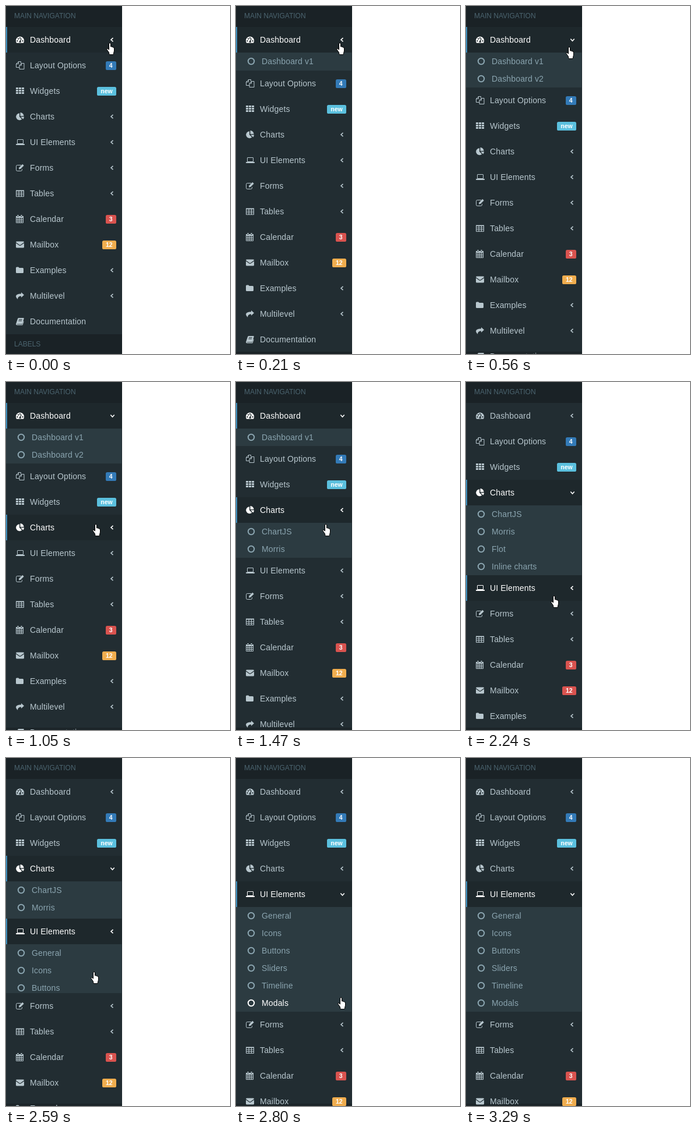
These frames come from a looping animation (384x598 px, 3.57 s). An HTML page:

```html
<!DOCTYPE html>
<html lang="en">
<head>
<meta charset="utf-8">
<title>Sidebar menu</title>
<style>
  html, body { margin: 0; width: 100%; height: 100%; overflow: hidden; background: #fff; }
  nav {
    position: absolute; left: 0; top: 0; width: 199px; height: 598px; overflow: hidden;
    background: linear-gradient(#222d32 594px, #1c2529 0);
    font: 14px "Liberation Sans", Arial, sans-serif; color: #b8c7ce; white-space: nowrap;
  }
  header { height: 36px; padding-left: 14px; box-sizing: border-box; background: #1a2226; color: #4b646f; font-size: 12px; line-height: 34px; }
  .row { position: relative; height: 44px; padding-left: 41px; line-height: 44px; letter-spacing: .15px; }
  .row.on { background: #1e282c; color: #fff; box-shadow: inset 2px 0 #3c8dbc; }
  .sub { width: 198px; height: 0; overflow: hidden; background: #2c3b41; color: #8aa4af; }
  .leaf { position: relative; height: 30px; padding-left: 44px; line-height: 30px; letter-spacing: .15px; }
  .leaf.on { color: #fff; }
  svg { position: absolute; overflow: visible; fill: currentColor; fill-rule: evenodd; }
  .line { fill: none; stroke: currentColor; }
  .icon { left: 17px; top: 15px; width: 14px; height: 14px; }
  .ring { left: 20px; top: 9px; width: 12px; height: 12px; stroke-width: 2; }
  .angle { left: 178px; top: 18px; width: 8px; height: 8px; stroke-width: 1.6; }
  .active .angle { transform: translate(.5px, 0) rotate(-90deg); }
  .badge {
    position: absolute; right: 10px; top: 15px; padding: 2.1px 6.3px 2.4px; border-radius: 2.6px;
    font: bold 10.5px/10.5px "Liberation Sans", Arial, sans-serif; letter-spacing: 0; color: #fff;
  }
  #pointer { left: 0; top: 0; width: 14px; height: 21px; }
  #pointer path { fill: #fff; stroke: #000; stroke-linejoin: round; }
</style>
</head>
<body>
<nav id="nav"></nav>
<svg id="pointer"><path id="shape"/></svg>
<script>
const BLUE = '#337ab7', CYAN = '#5bc0de', RED = '#d9534f', AMBER = '#f0ad4e';

// icon: [filled path, stroked path, stroke width]
const items = [
  { name: 'Dashboard', sub: ['Dashboard v1', 'Dashboard v2'],
    icon: ['M0 8.5a7 7 0 0 1 14 0q0 2-1 4H1Q0 10.500 0 8.500zM1.500 8h2v2h-2zM3 4.500h2v2H3zM6 3h2v2H6zM10.500 8h2v2h-2zM8.800 4.600l1.200.4-1.700 4a1.600 1.600 0 1 1-1.200-.4z'] },
  { name: 'Layout Options', badge: ['4', BLUE],
    icon: ['', 'M8.500 3V.5h-4l-4 4v6h5.500M4.500.5v4h-4M9.500 3.500h4.500v10H6v-6.500zM9.500 3.500v3.500H6'] },
  { name: 'Widgets', badge: ['new', CYAN],
    icon: ['M0 1h4v3H0zM5 1h4v3H5zM10 1h4v3h-4zM0 5h4v3H0zM5 5h4v3H5zM10 5h4v3h-4zM0 9h4v3H0zM5 9h4v3H5zM10 9h4v3h-4z'] },
  { name: 'Charts', sub: ['ChartJS', 'Morris', 'Flot', 'Inline charts'],
    icon: ['M6 1.200a6 6 0 1 0 4.300 10.400L6 7.300zM7.500 0a6 6 0 0 1 6 6h-6zM8 7.300h6a6 6 0 0 1-1.800 4.200z'] },
  { name: 'UI Elements', sub: ['General', 'Icons', 'Buttons', 'Sliders', 'Timeline', 'Modals'],
    icon: ['M0 10h15v1q0 1-1 1H1q-1 0-1-1z', 'M2.500 9.500V3q0-.5.5-.5h9q.5 0 .5.5v6.500z'] },
  { name: 'Forms', tree: true,
    icon: ['M5 9.500l.3-2.700L11.300.8l2.400 2.400L7.700 9.200z', 'M9 2.500H2.500q-2 0-2 2v6q0 2 2 2h6q2 0 2-2V9'] },
  { name: 'Tables', tree: true,
    icon: ['M0 1.500h14v2H0z', 'M.5 2v10.500h13V2M.5 6.500h13M.5 9.500h13M5 3v9.500M9.500 3v9.500'] },
  { name: 'Calendar', badge: ['3', RED],
    icon: ['M0 2h13v3H0zM2.500 0h2v3h-2zM8.500 0h2v3h-2z', 'M.5 3v10.500h12V3M.5 7.500h12M.5 10.500h12M3.500 5v8.500M6.500 5v8.500M9.500 5v8.500'] },
  { name: 'Mailbox', badge: ['12', AMBER],
    icon: ['M0 3q0-1.500 1.500-1.500h11Q14 1.500 14 3L7.800 7.500q-.8.5-1.600 0zM0 4.500l5.700 4q1.300.8 2.600 0L14 4.500v6.500q0 1.500-1.500 1.500h-11Q0 12.500 0 11z'] },
  { name: 'Examples', tree: true,
    icon: ['M0 3q0-1.500 1.500-1.500h2.500q1.500 0 1.500 1.500h6q1.500 0 1.500 1.500v6q0 1.500-1.500 1.500h-10Q0 12 0 10.500z'] },
  { name: 'Multilevel', tree: true,
    icon: ['M9 1l5 4.500L9 10V7.500q-6 0-6 5.500Q0 10 0 8q0-4.500 9-4.500z'] },
  { name: 'Documentation',
    icon: ['M4.500 1H13q1 0 .7 1l-2.400 8.500q-.3 1-1.300 1H2.500q-1 0-.8.8h9.300l1.600-5.800 1 .5-1.700 5.500q-.3 1-1.200 1H2q-2 0-2-2L3 2.500Q3.500 1 4.500 1zM5.200 3.300l-.3 1h5.600l.3-1zM4.600 5.500l-.3 1h5.600l.3-1z'] }
];

const iconSvg = ([fill, line = '']) =>
  `<svg class="icon"><path d="${fill}"/><path class="line" d="${line}"/></svg>`;
const angle = '<svg class="angle"><path class="line" d="M5.500 .8L2 4l3.500 3.200"/></svg>';
const ring = '<svg class="ring"><circle class="line" cx="6" cy="6" r="5.200"/></svg>';
const leaf = text => `<div class="leaf">${ring}${text}</div>`;
const badge = ([text, color]) => `<span class="badge" style="background:${color}">${text}</span>`;

nav.innerHTML = '<header>MAIN NAVIGATION</header>' + items.map(it =>
  `<div class="row">${iconSvg(it.icon)}${it.name}${it.sub || it.tree ? angle : ''}${it.badge ? badge(it.badge) : ''}</div>` +
  `<div class="sub">${(it.sub || []).map(leaf).join('')}</div>`).join('') + '<header>LABELS</header>';

const rows = [...nav.querySelectorAll('.row')];
const subs = [...nav.querySelectorAll('.sub')];
const links = [...nav.querySelectorAll('.row, .leaf')];
const mailBadge = rows[8].querySelector('.badge');

const LOOP = 3570, TICK = 70, SLIDE = 220;
const HAND = 'M4.500 2Q4.500.5 6 .5T7.500 2v5Q9 6 10 7.500q1.500-.5 2 1 1.500-.5 1.500 1.500v4L12 20.500H5L4.500 17 .8 11.500Q.5 9.500 2 10l2.500 2z';
const ARROW = 'M.5.5v15l3.500-3.200 2.500 5.700 2.200-1-2.500-5.400h5z';

// pointer moves: start, end, x, y
const moves = [
  [490, 1050, 154, 244], [1610, 1890, 153, 385], [2030, 2240, 151, 367],
  [2730, 3010, 267, 544], [3010, 3220, 344, 588]
];

const clamp = k => Math.max(0, Math.min(1, k));
const swing = k => .5 - Math.cos(Math.PI * clamp(k)) / 2;

function heights(t) {
  const [a, b, c] = [98, 1360, 2485].map(s => swing((t - s) / SLIDE));
  return items.map((it, i) => Math.round(({ 0: 60 * (a - b), 3: 120 * (b - c), 4: 180 * c })[i] || 0));
}

function pointerAt(t) {
  let x = 178, y = 63;
  for (const [start, end, toX, toY] of moves) {
    const k = clamp((t - start) / (end - start)), e = start < 2700 ? swing(k) : k;
    x += (toX - x) * e;
    y += (toY - y) * e;
  }
  return [Math.round(x), Math.round(y)];
}

// Hover is only re-evaluated while the pointer moves.
function hovered(t) {
  let m = 0;
  for (const [start, end] of moves) if (t > start) m = Math.min(t, end);
  const [x, y] = pointerAt(m), h = heights(m);
  if (x >= 199) return null;
  let top = 36;
  for (let i = 0; i < rows.length; i++) {
    if (y < top + 44) return rows[i];
    top += 44;
    if (y < top + h[i]) return subs[i].children[Math.floor((y - top) / 30)];
    top += h[i];
  }
  return null;
}

function draw(now) {
  const t = Math.floor(now % LOOP / TICK) * TICK;
  const active = rows[t < 350 ? -1 : t < 1680 ? 0 : t < 2800 ? 3 : 4];
  const hover = hovered(t);
  heights(t).forEach((h, i) => subs[i].style.height = h + 'px');
  links.forEach(el => {
    el.classList.toggle('on', el === hover || el === active);
    el.classList.toggle('active', el === active);
  });
  mailBadge.style.background = t >= 1540 && t < 2520 ? RED : AMBER;

  const [x, y] = pointerAt(t), onMenu = x < 199;
  pointer.style.transform = `translate(${onMenu ? x - 6 : x}px, ${y}px)`;
  pointer.style.visibility = t < 3290 ? 'visible' : 'hidden';
  shape.setAttribute('d', onMenu ? HAND : ARROW);
}

const begin = performance.now();
(function frame() {
  draw(performance.now() - begin);
  requestAnimationFrame(frame);
})();
</script>
</body>
</html>
```
